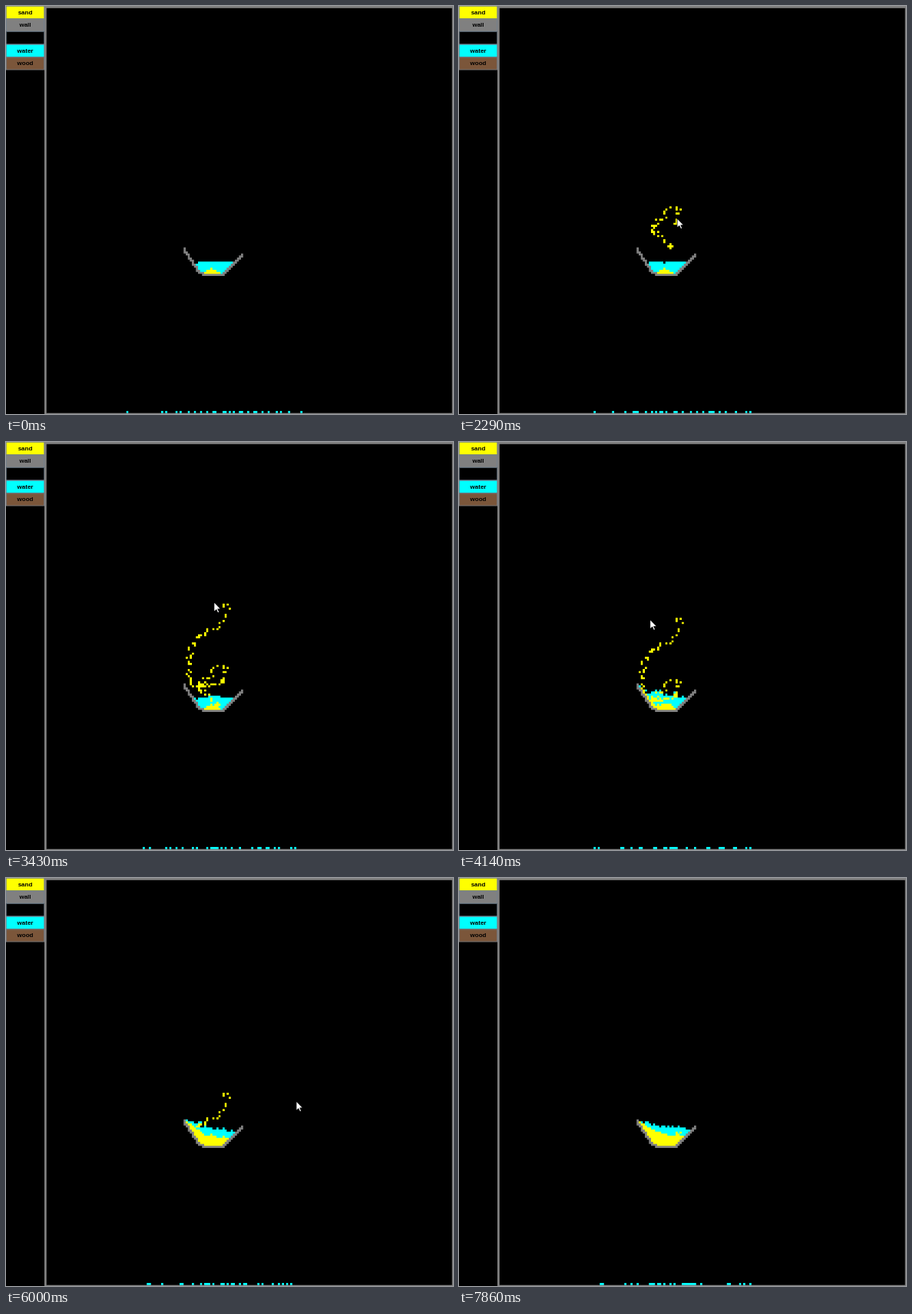
An HTML page with a canvas that plays this animation: 582 by 532 pixels, repeating every 8.01 s.

```html
<!DOCTYPE html>
<html lang="en">
<head>
<meta charset="utf-8">
<title>Falling sand</title>
<style>
html, body { margin: 0; width: 100%; height: 100%; overflow: hidden; background: #000; }
#stage {
  position: absolute; left: 0; top: 0; width: 873px; height: 798px; overflow: hidden;
  transform: scale(calc(2 / 3)); transform-origin: 0 0;
}
canvas { position: absolute; left: 0; top: 0; }
.tool {
  position: relative; width: 75px; height: 25px; box-sizing: border-box;
  border: 1px solid #708090; color: #000; text-align: center;
  font: bold 12px/23px "Liberation Sans", Arial, sans-serif;
}
</style>
</head>
<body>
<div id="stage">
  <canvas id="view" width="873" height="798"></canvas>
  <div class="tool" style="background:#ff0">sand</div>
  <div class="tool" style="background:#808080">wall</div>
  <div class="tool" style="background:#000"></div>
  <div class="tool" style="background:#0ff">water</div>
  <div class="tool" style="background:#7b563a">wood</div>
</div>
<script>
const ctx = document.getElementById('view').getContext('2d');
const LOOP = 8010, FRAMES = 56, FRAME = LOOP / FRAMES;
const CELL = 4, ZOOM = 1.5;
const FIRST = 19, LAST = 218, ROWS = 200, COLS = LAST + 1;
const EMPTY = 0, WALL = 1, SAND = 2, WATER = 3;
const colors = ['', '#808080', '#ff0', '#0ff'];
const POUR_START = 1720, POUR_END = 3390, POUR_EVERY = 16;

// pointer tip on the stage: [time, x, y]
const path = [
  [280, 70, 60], [1150, 20, 4], [1287, 168, 141], [1720, 275, 295],
  [1860, 258, 286], [1960, 253, 280], [2080, 264, 271], [2160, 270, 263],
  [2240, 286, 263], [2289, 284, 277], [2430, 275, 291], [2570, 251, 295],
  [2720, 240, 291], [2860, 238, 272], [3000, 243, 256], [3180, 261, 241],
  [3270, 279, 236], [3350, 289, 213], [3433, 271, 209], [3900, 256, 230],
  [4863, 248, 234], [5710, 396, 288], [6008, 378, 291], [6570, 482, 275],
  [7000, 310, 245], [7580, 22, 76]
];

// bowl outline: [column, row]
const bowl = [[87, 118], [94, 129], [98, 131], [105, 131], [115, 121]];

const segment = (points, v) => {
  let i = 0;
  while (i < points.length - 2 && v >= points[i + 1][0]) i++;
  return i;
};

// smooth curve through the pointer positions
function pointerAt(t) {
  const i = segment(path, t), a = path[i], b = path[i + 1];
  const before = path[i - 1] || a, after = path[i + 2] || b;
  const span = b[0] - a[0], f = Math.min(1, Math.max(0, (t - a[0]) / span));
  return [1, 2].map(n => {
    const va = (b[n] - before[n]) / (b[0] - before[0]) * span;
    const vb = (after[n] - a[n]) / (after[0] - a[0]) * span;
    const d = b[n] - a[n];
    return a[n] + f * (va + f * (3 * d - 2 * va - vb + f * (va + vb - 2 * d)));
  });
}

function bowlTop(col) {
  const i = segment(bowl, col), [c, r] = bowl[i], [c2, r2] = bowl[i + 1];
  return Math.round(r + (r2 - r) * (col - c) / (c2 - c));
}

let seed = 7;
function random() {
  seed = (seed + 0x6D2B79F5) | 0;
  let v = Math.imul(seed ^ (seed >>> 15), 1 | seed);
  v ^= v + Math.imul(v ^ (v >>> 7), 61 | v);
  return ((v ^ (v >>> 14)) >>> 0) / 4294967296;
}

const grid = new Uint8Array(COLS * ROWS);
const moved = new Int16Array(COLS * ROWS).fill(-1);
const at = (col, row) => row * COLS + col;

function build() {
  for (let col = FIRST; col <= LAST; col++) {
    grid[at(col, 0)] = grid[at(col, ROWS - 1)] = WALL;
  }
  for (let row = 0; row < ROWS; row++) {
    grid[at(FIRST, row)] = grid[at(LAST, row)] = WALL;
  }
  for (let col = 87; col <= 115; col++) {
    const top = bowlTop(col);
    const low = Math.max(top, col > 87 ? bowlTop(col - 1) : 0, col < 115 ? bowlTop(col + 1) : 0);
    for (let row = top; row <= low; row++) grid[at(col, row)] = WALL;
    for (let row = 125; row < top; row++) {
      const pile = row >= 128 + Math.abs(col - 100) * 0.45;
      if (row > 125 || random() > 0.1) grid[at(col, row)] = pile ? SAND : WATER;
    }
  }
  // loose drops on the floor, densest in the middle
  grid[at(59, ROWS - 2)] = WATER;
  for (let i = 0; i < 25; i++) {
    const v = i / 12 - 1;
    const col = 109 + 34 * v * (0.6 + 0.4 * Math.abs(v)) + (random() - 0.5) * 2;
    grid[at(Math.round(col), ROWS - 2)] = WATER;
  }
}

function pour(from, to) {
  for (let t = POUR_START; t < POUR_END; t += POUR_EVERY) {
    if (t < from || t >= to) continue;
    const [x, y] = pointerAt(t);
    const col = Math.floor((x * ZOOM + 1) / CELL + (random() - 0.5) * 2.4);
    const row = Math.floor(y * ZOOM / CELL + (random() - 0.5) * 2.4);
    if (grid[at(col, row)] === EMPTY) grid[at(col, row)] = SAND;
  }
}

function swap(a, b, step) {
  [grid[a], grid[b]] = [grid[b], grid[a]];
  moved[b] = step;
}

function moveCell(i, step) {
  const kind = grid[i], side = random() < 0.5 ? -1 : 1;
  const free = j => grid[j] === EMPTY || (kind === SAND && grid[j] === WATER);
  if (free(i + COLS)) return swap(i, i + COLS, step);
  for (const d of [side, -side]) {
    if (grid[i + d] !== WALL && free(i + COLS + d)) return swap(i, i + COLS + d, step);
  }
  if (kind === WATER && free(i + side)) swap(i, i + side, step);
}

function advance(step) {
  for (let row = ROWS - 2; row > 0; row--) {
    for (let n = FIRST + 1; n < LAST; n++) {
      const i = at(step % 2 ? n : FIRST + LAST - n, row);
      if (grid[i] >= SAND && moved[i] !== step) moveCell(i, step);
    }
  }
}

const stepAt = t => Math.floor(t / 100 + 0.4);
const history = [];
build();
for (let step = 0; step <= stepAt(LOOP); step++) {
  if (step) advance(step);
  pour(step * 100 - 40, step * 100 + 60);
  history.push(grid.slice());
}

// grains poured later within the same step stay hidden until their time
function drawCells(state) {
  for (let row = 0; row < ROWS; row++) {
    for (let col = FIRST; col <= LAST; col++) {
      const kind = state[at(col, row)];
      if (!kind) continue;
      ctx.fillStyle = colors[kind];
      ctx.fillRect(col * CELL - 1, row * CELL, CELL, CELL);
    }
  }
}

const arrow = new Path2D('M0 0V17L4 13.3L6.6 19L9.2 18L6.7 12.4H12Z');
function drawPointer(t) {
  if (t < 280 || t > 7650) return;
  const [x, y] = pointerAt(t);
  ctx.save();
  ctx.translate(x * ZOOM, y * ZOOM);
  ctx.scale(1.08, 1.08);
  ctx.fillStyle = '#fff';
  ctx.strokeStyle = '#000';
  ctx.fill(arrow);
  ctx.stroke(arrow);
  ctx.restore();
}

let shown = -1;
function draw(ms) {
  const k = Math.floor((ms % LOOP + 10) / FRAME) % FRAMES;
  if (k === shown) return;
  shown = k;
  ctx.clearRect(0, 0, 873, 798);
  drawCells(history[stepAt(k * FRAME)]);
  drawPointer(k * FRAME);
}

const start = performance.now();
function tick() {
  draw(performance.now() - start);
  requestAnimationFrame(tick);
}
tick();
</script>
</body>
</html>
```
